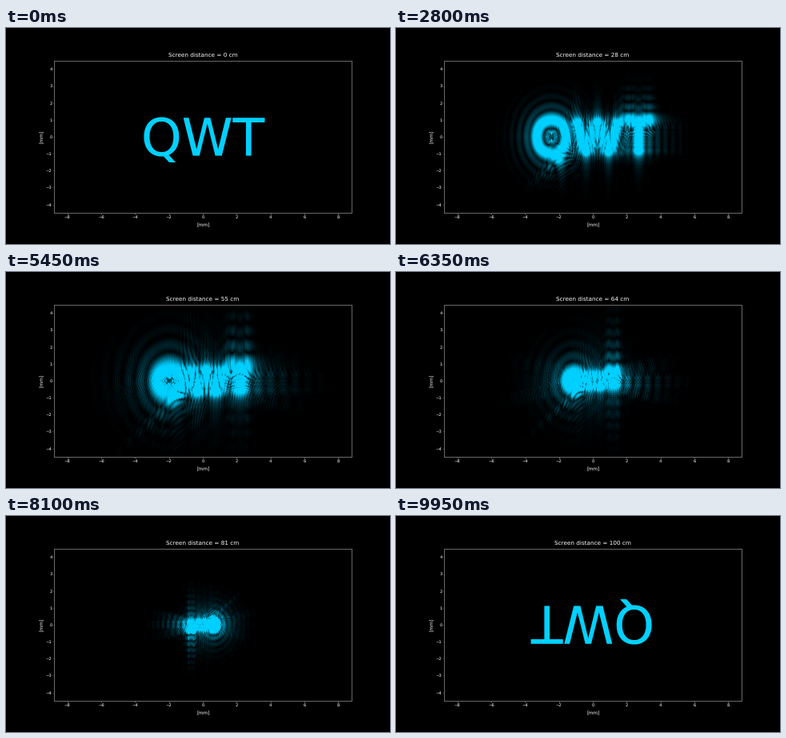
These frames come from a looping animation (480x270 px, 10000 ms). A matplotlib script:

```python
import numpy as np
import matplotlib.pyplot as plt
from matplotlib.animation import FuncAnimation
from matplotlib.colors import LinearSegmentedColormap
from matplotlib.path import Path
from matplotlib.textpath import TextPath

# Light through a letter-shaped aperture, then a lens half way.
# All lengths are in millimetres.
FRAMES = 200
WAVE = 488e-6
FOCAL = 250.0
LENS_AT = 500.0
GAIN = 3.5
SOFT = 0.008              # blur of the aperture's edges

COLS, ROWS = 372, 190
PIXEL = 17.58 / COLS
STEP = PIXEL / 2          # display samples and FFT grid
FINE = PIXEL / 4          # aperture samples
NX, NY = 768, 480         # FFT grid
AX, AY = 640, 272         # aperture samples across and up
EM = 3.05


def centred(n, step):
    return (np.arange(n) + 0.5 - n / 2) * step


def halve(a):
    """Mean of each 2 by 2 block."""
    return (a[::2, ::2] + a[1::2, ::2] + a[::2, 1::2] + a[1::2, 1::2]) / 4


def letter_mask():
    # A large outline keeps the flattened curves smooth.
    size = 300
    outline = TextPath((0, 0), "QWT", size=size)
    xs = (centred(2 * AX, FINE / 2) / EM + 1.1935) * size
    ys = (centred(2 * AY, FINE / 2) + 1.11) / EM * size
    gx, gy = np.meshgrid(xs, ys)
    points = np.column_stack([gx.ravel(), gy.ravel()])
    inside = np.zeros(len(points), bool)
    for poly in outline.to_polygons():
        inside ^= Path(poly).contains_points(points)

    def blur(n):
        return np.exp(-2 * (np.pi * SOFT * np.fft.fftfreq(n, FINE / 2)) ** 2)

    spec = np.fft.fft2(inside.reshape(gx.shape).astype(float))
    return halve(np.fft.ifft2(spec * blur(2 * AY)[:, None] * blur(2 * AX)).real)


in_x, in_y = centred(AX, FINE), centred(AY, FINE)
out_x, out_y = centred(2 * COLS, STEP), centred(2 * ROWS, STEP)
mask = letter_mask()
mask_c = mask.astype(np.complex64)

pad_y, pad_x = (NY - AY // 2) // 2, (NX - AX // 2) // 2
spectrum = np.fft.fft2(np.pad(halve(mask), ((pad_y, pad_y), (pad_x, pad_x))))
freq_x, freq_y = np.fft.fftfreq(NX, STEP), np.fft.fftfreq(NY, STEP)


def power(field):
    return field.real ** 2 + field.imag ** 2


def pick(coords, scale, n):
    """Grid indices for scaled coordinates, and which of them are valid."""
    idx = np.floor(coords / scale / STEP + n / 2).astype(int)
    return np.clip(idx, 0, n - 1), (idx >= 0) & (idx < n)


def free_space(z, scale):
    """Fresnel pattern at distance z, magnified by scale."""
    hx = np.exp(-1j * np.pi * WAVE * z * freq_x ** 2)
    hy = np.exp(-1j * np.pi * WAVE * z * freq_y ** 2)
    rows, ok_y = pick(out_y, scale, NY)
    cols, ok_x = pick(out_x, scale, NX)
    field = np.fft.ifft(spectrum * hy[:, None] * hx, axis=0)
    field = np.fft.ifft(field[rows], axis=1)
    light = power(field)[:, cols] / scale ** 2
    return light * ok_y[:, None] * ok_x


def fresnel_integral(a, b):
    """Pattern of the ray system (a, b), integrated directly."""
    reach = WAVE * b / (2 * FINE)
    use_x, use_y = np.abs(out_x) < reach, np.abs(out_y) < reach

    def kernel(out, src):
        phase = np.pi / (WAVE * b) * (a * src ** 2 - 2 * np.outer(out, src))
        return np.exp(1j * phase).astype(np.complex64)

    field = kernel(out_y[use_y], in_y) @ (mask_c @ kernel(out_x[use_x], in_x).T)
    light = np.zeros((2 * ROWS, 2 * COLS))
    light[np.ix_(use_y, use_x)] = power(field) * (FINE ** 2 / (WAVE * b)) ** 2
    return light


def intensity(z):
    d = max(z - LENS_AT, 0)
    scale = 1 - d / FOCAL
    start = min(z, LENS_AT)
    if 400 < z < 850:
        return fresnel_integral(scale, start * scale + d)
    return free_space(start + d / scale, scale)


def brightness(z):
    light = np.minimum(GAIN * intensity(z), 1).astype(np.float32)
    tone = np.where(light < 0.0031308, 12.92 * light,
                    1.055 * light ** np.float32(1 / 2.4) - 0.055)
    return halve(tone)


# At 72 dpi one point is one pixel.
plt.rcParams.update({"font.family": "DejaVu Sans", "text.hinting": "none",
                     "toolbar": "None"})
fig = plt.figure(figsize=(480 / 72, 270 / 72), dpi=72, facecolor="black")
ax = fig.add_axes([60 / 480, 39 / 270, COLS / 480, ROWS / 270],
                  facecolor="black")
half_w, half_h = COLS * PIXEL / 2, ROWS * PIXEL / 2
cyan = LinearSegmentedColormap.from_list(
    "cyan", ["black", (0, 0.816, 1)], N=256)
image = ax.imshow(np.zeros((ROWS, COLS)), cmap=cyan, vmin=0, vmax=1,
                  origin="lower", aspect="auto", interpolation="nearest",
                  extent=[-half_w, half_w, -half_h, half_h])
ax.set_xticks(range(-8, 9, 2))
ax.set_yticks(range(-4, 5))
ax.tick_params(length=1.5, width=0.8, color="#808080", labelcolor="white",
               labelsize=5.3)
ax.tick_params(axis="x", pad=2.1)
ax.tick_params(axis="y", pad=0.9)
for spine in ax.spines.values():
    spine.set(color="#686868", linewidth=1)


def label(x, y, text, size, **kw):
    return fig.text(x / 480, 1 - y / 270, text, size=size, color="white",
                    ha="center", **kw)


label(246.2, 246.2, "[mm]", 6, va="center")
label(45.3, 136.3, "[mm]", 6, va="center", rotation=90)
title = label(246, 36.2, "", 7.3, va="baseline")


def update(i):
    z = 100 * i / (FRAMES - 1)
    image.set_data(brightness(10 * z))
    title.set_text(f"Screen distance = {z:.0f} cm")
    return image, title


anim = FuncAnimation(fig, update, frames=FRAMES, interval=50, repeat=True,
                     repeat_delay=0)
plt.show()
```
